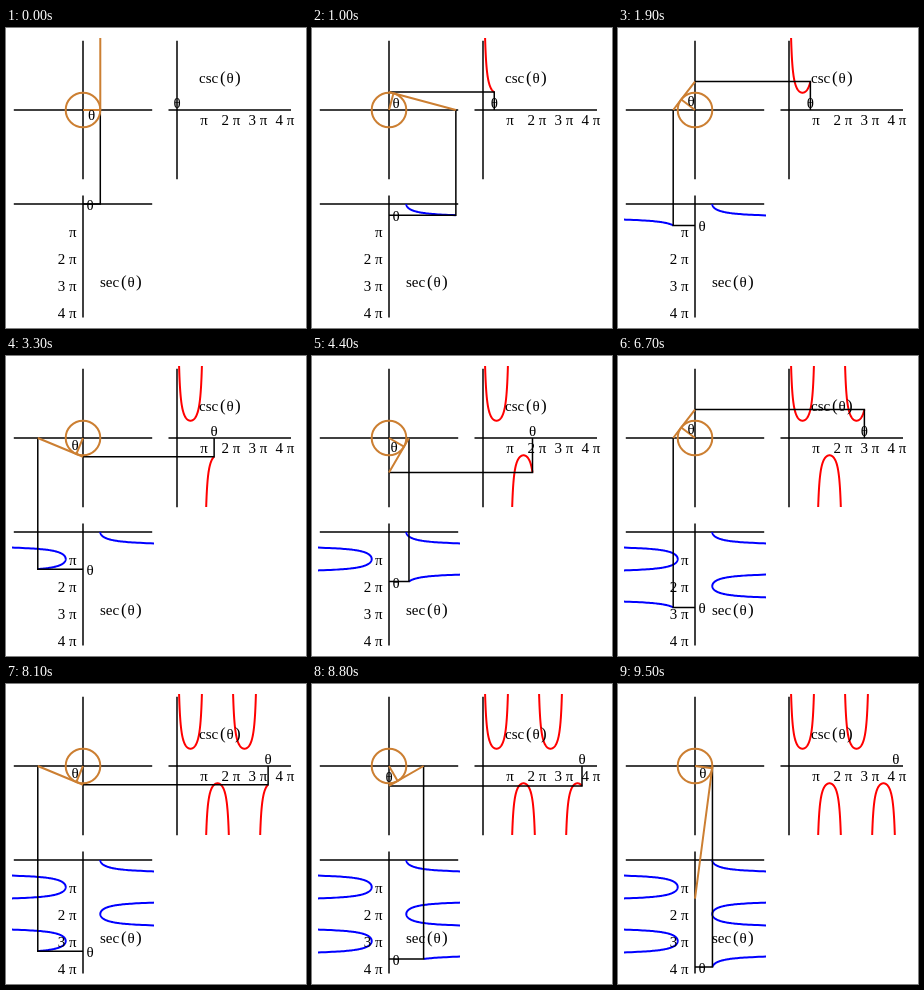
Write an HTML page with a canvas that moves like this. It is 300 by 300 pixels and loops after 9.6 s.

```html
<!DOCTYPE html>
<html lang="en">
<head>
<meta charset="utf-8">
<title>Secant and cosecant</title>
<style>
html, body { margin: 0; width: 100%; height: 100%; overflow: hidden; background: #fff; }
canvas { display: block; width: 300px; height: 300px; }
</style>
</head>
<body>
<canvas id="stage"></canvas>
<script>
const LOOP = 9600, STEP = 100, PER_TURN = 48;
const OX = 77, OY = 82;          // centre of the unit circle
const CSC_X = 171, SEC_Y = 176;  // origins of the two graphs
const R = 17.3, PI_LEN = 27, REACH = 4.1;
const BLACK = '#000', GOLD = '#cc7f32', RED = '#f00', BLUE = '#00f';

const canvas = document.getElementById('stage');
const ctx = canvas.getContext('2d');
const dpr = window.devicePixelRatio || 1;
canvas.width = canvas.height = 300 * dpr;
ctx.scale(dpr, dpr);

const csc = a => 1 / Math.sin(a);
const sec = a => 1 / Math.cos(a);
const along = a => a / Math.PI * PI_LEN;

function line(color, width, ...points) {
  ctx.strokeStyle = color;
  ctx.lineWidth = width;
  ctx.beginPath();
  points.forEach(([x, y]) => ctx.lineTo(x, y));
  ctx.stroke();
}

function text(str, x, y, align = 'center', size = 15) {
  ctx.font = size + 'px "Liberation Serif", "Times New Roman", serif';
  ctx.textAlign = align;
  ctx.fillStyle = BLACK;
  ctx.fillText(str, x, y);
}

function clipped(x0, y0, x1, y1, draw) {
  ctx.save();
  ctx.beginPath();
  ctx.rect(x0, y0, x1 - x0, y1 - y0);
  ctx.clip();
  draw();
  ctx.restore();
}

function curve(color, end, fn, place) {
  const count = Math.ceil(end * 60);
  let pen = false, last = 0;
  ctx.strokeStyle = color;
  ctx.lineWidth = 2;
  ctx.beginPath();
  for (let i = 0; i <= count; i++) {
    const a = end * i / count, v = fn(a);
    if (Math.abs(v) > 30) { pen = false; continue; }
    if (v * last < 0) pen = false;
    const [x, y] = place(a, v);
    pen ? ctx.lineTo(x, y) : ctx.moveTo(x, y);
    pen = true;
    last = v;
  }
  ctx.stroke();
}

function axes() {
  const arm = 4 * R;
  line(BLACK, 1.5, [OX - arm, OY], [OX + arm, OY]);
  line(BLACK, 1.5, [OX, OY - arm], [OX, OY + arm]);
  line(BLACK, 1.5, [CSC_X - 8.5, OY], [285, OY]);
  line(BLACK, 1.5, [CSC_X, OY - arm], [CSC_X, OY + arm]);
  line(BLACK, 1.5, [OX - arm, SEC_Y], [OX + arm, SEC_Y]);
  line(BLACK, 1.5, [OX, SEC_Y - 8.5], [OX, 289.5]);
}

function funcName(name, x, y) {
  text(name, x, y, 'left');
  text('(', x + 21, y, 'left', 17);
  text('θ', x + 31, y);
  text(')', x + 36, y, 'left', 17);
}

function labels() {
  for (let n = 1; n <= 4; n++) {
    const str = n > 1 ? n + ' π' : 'π';
    text(str, CSC_X + n * PI_LEN, 97);
    text(str, 70.5, SEC_Y + n * PI_LEN + 5.5, 'right');
  }
  funcName('csc', 193, 55);
  funcName('sec', 94, 259);
}

function triangle(a, sx, cy) {
  const tip = [OX + R * Math.cos(a), OY - R * Math.sin(a)];
  ctx.strokeStyle = GOLD;
  ctx.lineWidth = 2;
  ctx.beginPath();
  ctx.arc(OX, OY, R, 0, 2 * Math.PI);
  ctx.stroke();
  line(GOLD, 2, [OX, OY], tip);
  clipped(6, 10, 286.5, 290, () => line(GOLD, 2, [sx, OY], tip, [OX, cy]));
}

function draw(step) {
  // the nudge picks a side at the poles
  const a = step * 2 * Math.PI / PER_TURN + 1e-4;
  const s = sec(a), c = csc(a);
  const sx = OX + R * s, cy = OY - R * c;
  const px = CSC_X + along(a), py = SEC_Y + along(a);

  ctx.fillStyle = '#fff';
  ctx.fillRect(0, 0, 300, 300);
  axes();
  clipped(160, 10, 290, 151, () =>
    curve(RED, a, csc, (t, v) => [CSC_X + along(t), OY - R * v]));
  clipped(6, 160, 148, 292, () =>
    curve(BLUE, a, sec, (t, v) => [OX + R * v, SEC_Y + along(t)]));
  if (Math.abs(s) < REACH) line(BLACK, 1.5, [sx, OY], [sx, py], [OX, py]);
  if (Math.abs(c) < REACH) line(BLACK, 1.5, [OX, cy], [px, cy], [px, OY]);
  triangle(a, sx, cy);
  labels();

  const lead = a - Math.PI / 6;
  text('θ', OX + 10 * Math.cos(lead), OY - 10 * Math.sin(lead) + 5.5);
  text('θ', px, 80);
  text('θ', 84, py + 6);
}

function frame(now) {
  draw(Math.floor(now % LOOP / STEP));
  requestAnimationFrame(frame);
}
frame(0);
</script>
</body>
</html>
```
